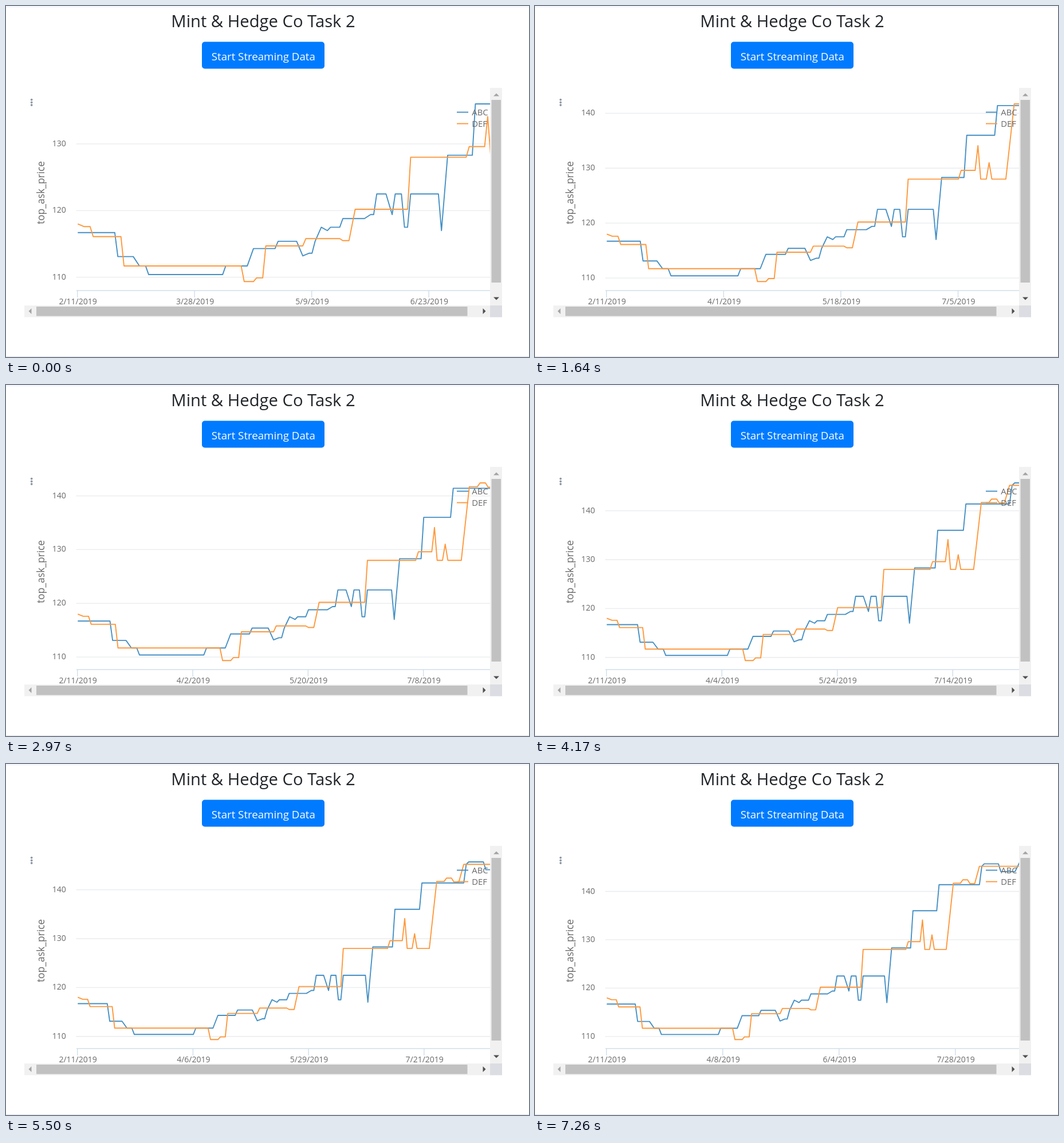
An HTML page that plays this animation: 913x613 px, repeating every 8 s.

```html
<!DOCTYPE html>
<html lang="en">
<head>
<meta charset="utf-8">
<title>Streaming prices</title>
<style>
  html, body { margin: 0; width: 100%; height: 100%; overflow: hidden; background: #fff; }
  svg { display: block; width: 913px; height: 613px; font-family: "Open Sans", "Noto Sans", sans-serif; }
  .label { fill: #696969; font-size: 14px; }
  .grid { stroke: #e8ebed; stroke-width: 1.3; }
  .axis { stroke: #cfdeeb; stroke-width: 1.4; fill: none; }
  .line { fill: none; stroke-width: 1.9; stroke-linejoin: round; }
  .abc { stroke: #4590c5; }
  .def { stroke: #ff983c; }
  .track { fill: #f1f1f1; }
  .thumb { fill: #c1c1c1; }
  .on { fill: #505050; }
  .off { fill: #a3a3a3; }
</style>
</head>
<body>
<svg viewBox="0 0 913 613">
  <defs><clipPath id="plot"><rect x="32" y="143" width="813" height="380"/></clipPath></defs>
  <rect width="913" height="3" fill="#f7f8fd"/>
  <rect y="612" width="913" height="1" fill="#dfe1e5"/>
  <text x="449" y="37" text-anchor="middle" font-size="29.2" fill="#212529">Mint &amp; Hedge Co Task 2</text>
  <rect x="342" y="62.5" width="214" height="47" rx="5" fill="#007bff"/>
  <text x="449.3" y="94.5" text-anchor="middle" font-size="18.7" fill="#fff">Start Streaming Data</text>

  <g fill="#8d98a5">
    <circle cx="44.7" cy="163.6" r="1.9"/>
    <circle cx="44.7" cy="168.3" r="1.9"/>
    <circle cx="44.7" cy="173" r="1.9"/>
  </g>
  <text class="label" transform="translate(67 326) rotate(-90)" text-anchor="middle" style="font-size:17.4px">top_ask_price</text>

  <g clip-path="url(#plot)">
    <g id="axes"></g>
    <path id="abc" class="line abc"/>
    <path id="def" class="line def"/>
    <path class="line abc" d="M787 185.5H807"/>
    <path class="line def" d="M787 205.5H807"/>
    <g class="label" style="font-size:14.8px">
      <text x="813.3" y="191">ABC</text>
      <text x="813.3" y="211">DEF</text>
    </g>
  </g>

  <rect class="track" x="845" y="143" width="21" height="380"/>
  <rect class="thumb" x="847.5" y="164" width="16.5" height="319"/>
  <path class="off" d="M851 157.5h10l-5 -5z"/>
  <path class="on" d="M851 508.5h10l-5 5z"/>
  <rect class="track" x="32" y="523" width="813" height="20.5"/>
  <rect class="thumb" x="53" y="525" width="752.5" height="16.5"/>
  <path class="off" d="M44.5 528v10l-5 -5z"/>
  <path class="on" d="M832.5 528v10l5 -5z"/>
  <rect x="845" y="523" width="21" height="20.5" fill="#dcdde2"/>
</svg>
<script>
const LOOP = 8000, LEFT = 125.3, WIDTH = 721, BASE = 496.8, HEIGHT = 341.3;

// Start of each update in ms and the samples received by then
const updates = [[0, 134], [380, 140], [1640, 148], [2970, 154], [4170, 161], [5500, 168], [6160, 174]];

// A price holds, then moves to the next level, arriving at the given sample
// after a ramp of one sample unless a third value says otherwise.
const steps = levels => levels.flatMap(([at, price, ramp = 1], k) =>
  k ? [[at - ramp, levels[k - 1][1]], [at, price]] : [[at, price]]
).concat([[200, levels.at(-1)[1]]]);

const abc = steps([
  [0, 116.7], [13, 113.1], [20, 111.7, 2], [23, 110.4], [48, 111.7], [57, 114.3, 2], [65, 115.4],
  [73, 113.2, 2], [75, 113.6, 2], [77, 115.4], [79, 117.5, 2], [81, 117, 2], [82, 117.5],
  [86, 118.8], [95, 119.4, 2], [97, 122.5], [102, 119.4, 2], [103, 122.5], [106, 117.5],
  [108, 122.5], [118, 117], [120, 128.3, 2], [129, 136], [140, 141.4], [158, 145.2],
  [159, 145.7], [166, 144.1], [174, 146.1, 2]
]);
const def = steps([
  [0, 118], [2, 117.6, 2], [5, 116.1], [15, 111.7], [54, 109.35], [58, 109.9], [61, 114.7],
  [74, 115.8], [86, 115.5], [90, 120.2, 2], [108, 128], [127, 129.6], [133, 134.1], [134, 128],
  [137, 131], [138, 128], [146, 141.7, 3], [150, 142.4], [153, 141.6], [157, 145.2, 2]
]);

// Days without a sample, accumulated up to a few samples
const skipped = [[0, 7], [49, 7], [76, 11], [92, 12], [98, 15], [114, 18], [135, 18], [147, 20]];

function interpolate(points, at) {
  const k = Math.max(1, points.findIndex(p => p[0] >= at));
  const [[x0, y0], [x1, y1]] = points.slice(k - 1, k + 1);
  return y0 + (y1 - y0) * (at - x0) / (x1 - x0);
}

function dateAt(sample) {
  const days = sample && sample + Math.round(interpolate(skipped, sample));
  const date = new Date(Date.UTC(2019, 1, 11 + days));
  return `${date.getUTCMonth() + 1}/${date.getUTCDate()}/2019`;
}

const get = id => document.getElementById(id);

function draw(count) {
  const prices = [...abc, ...def].filter(p => p[0] <= count).map(p => p[1]);
  const low = Math.min(...prices), range = Math.max(...prices) - low;
  const unit = HEIGHT / (range * 1.1);
  const x = sample => LEFT + sample * WIDTH / count;
  const y = price => BASE - (price - low + range * 0.05) * unit;
  const path = points => "M" + points.slice(0, points.findIndex(p => p[0] > count) + 1)
    .map(([sample, price]) => `${x(sample).toFixed(2)} ${y(price).toFixed(2)}`).join("L");

  let axes = "";
  for (let price = 110; y(price) > 180; price += 10) {
    axes += `<path class="grid" d="M122.5 ${y(price)}H845"/>
      <text class="label" x="104.7" y="${y(price) + 4}" text-anchor="end">${price}</text>`;
  }
  axes += `<path class="axis" d="M123 497H845"/>`;
  const every = Math.round(count * 0.2815);
  for (let sample = 0; sample < count; sample += every) {
    const tx = x(sample) - 0.6;
    axes += `<path class="axis" d="M${tx} 497v12"/>
      <text class="label" x="${tx + 0.9}" y="520.5" text-anchor="middle">${dateAt(sample)}</text>`;
  }
  get("axes").innerHTML = axes;
  get("abc").setAttribute("d", path(abc));
  get("def").setAttribute("d", path(def));
}

let shown;
function tick() {
  const t = performance.now() % LOOP;
  const [, count] = updates.findLast(([start]) => start <= t);
  if (count !== shown) draw(shown = count);
  requestAnimationFrame(tick);
}
tick();
</script>
</body>
</html>
```
